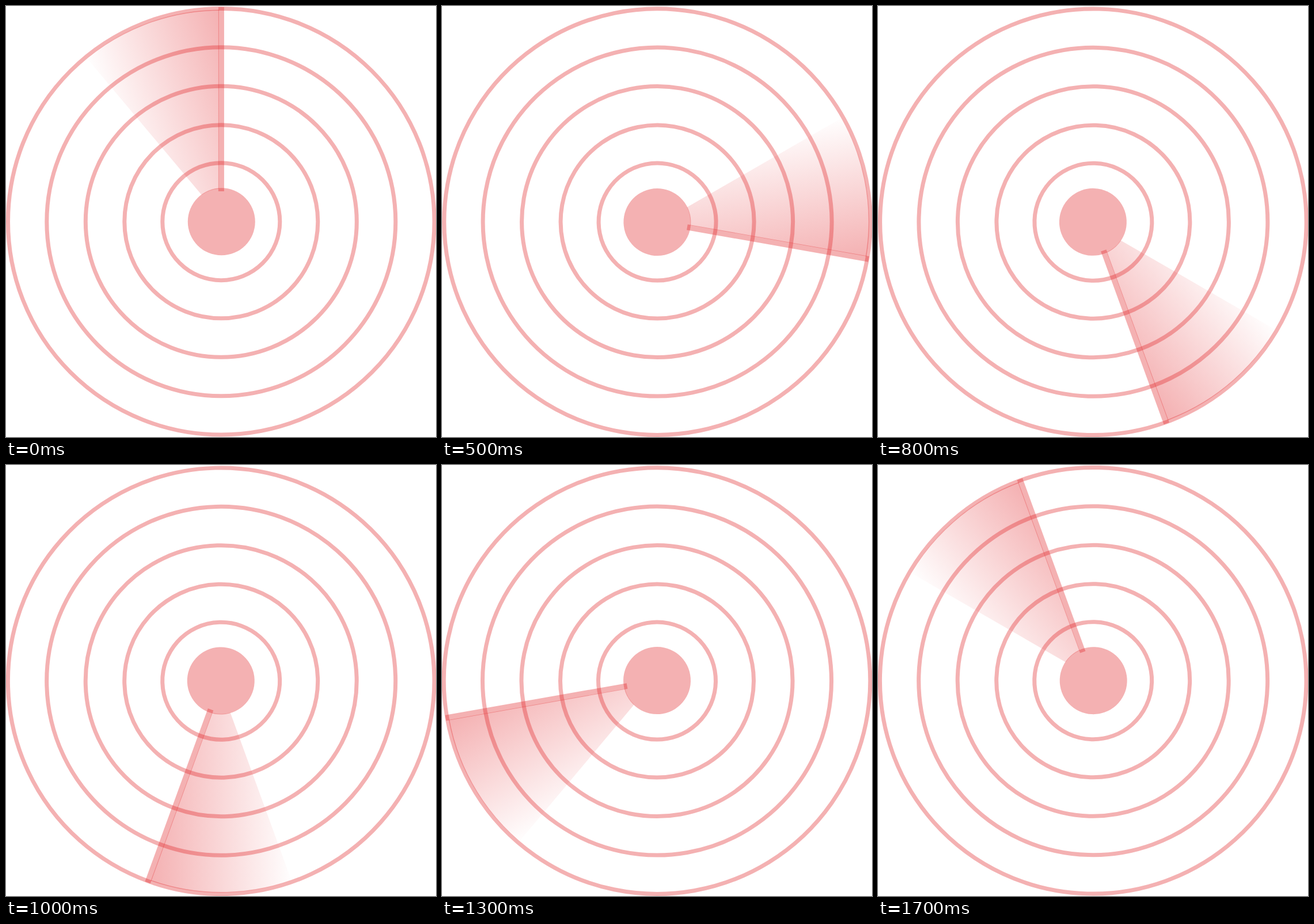
An HTML page that plays this animation: 747x749 px, repeating every 1.8 s.

```html
<!DOCTYPE html>
<html lang="en">
<head>
<meta charset="utf-8">
<title>Radar sweep</title>
<style>
  html, body { margin: 0; width: 100%; height: 100%; overflow: hidden; background: #fff; }
  svg { display: block; }
</style>
</head>
<body>
<svg width="747" height="749" viewBox="0 0 747 749">
  <defs>
    <linearGradient id="fade" gradientUnits="userSpaceOnUse" x1="-118" y1="43" x2="115" y2="-42">
      <stop offset="0" stop-color="#e02024" stop-opacity="0"/>
      <stop offset="1" stop-color="#e02024" stop-opacity=".35"/>
    </linearGradient>
  </defs>
  <g id="radar">
    <g id="rings" fill="none" stroke="#e02024" stroke-opacity=".35" stroke-width="7"></g>
    <g fill="#e02024" fill-opacity=".35">
      <circle cx=".5" cy="-.2" r="58.5"/>
      <path id="beam" fill="url(#fade)" fill-opacity="1"/>
      <rect x="-4.9" y="-373" width="10" height="320"/>
    </g>
  </g>
</svg>
<script>
const LOOP = 1800, STEP = 100;
const $ = id => document.getElementById(id);

$('rings').innerHTML = [102, 168, 235.5, 303, 370.3]
  .map(r => `<circle cy="-.3" r="${r}"/>`).join('');

// Both straight edges of the beam run parallel to a radius, 4px aside.
function edgePoint(radius, degrees, aside) {
  const a = degrees * Math.PI / 180, along = Math.sqrt(radius * radius - aside * aside);
  return [along * Math.sin(a) + aside * Math.cos(a), aside * Math.sin(a) - along * Math.cos(a)];
}
const inner = 57.5, outer = 368.5;
$('beam').setAttribute('d',
  `M${edgePoint(inner, -40, 4)} L${edgePoint(outer, -40, 4)}
   A${outer} ${outer} 0 0 1 ${edgePoint(outer, 0, -4)}
   L${edgePoint(inner, 0, -4)} A${inner} ${inner} 0 0 0 ${edgePoint(inner, -40, 4)}Z`);

let start;
function draw(now) {
  start ??= now;
  const step = Math.floor((now - start) % LOOP / STEP);
  $('radar').setAttribute('transform', `translate(373.8 375) rotate(${step * 360 * STEP / LOOP})`);
  requestAnimationFrame(draw);
}
draw(performance.now());
</script>
</body>
</html>
```
